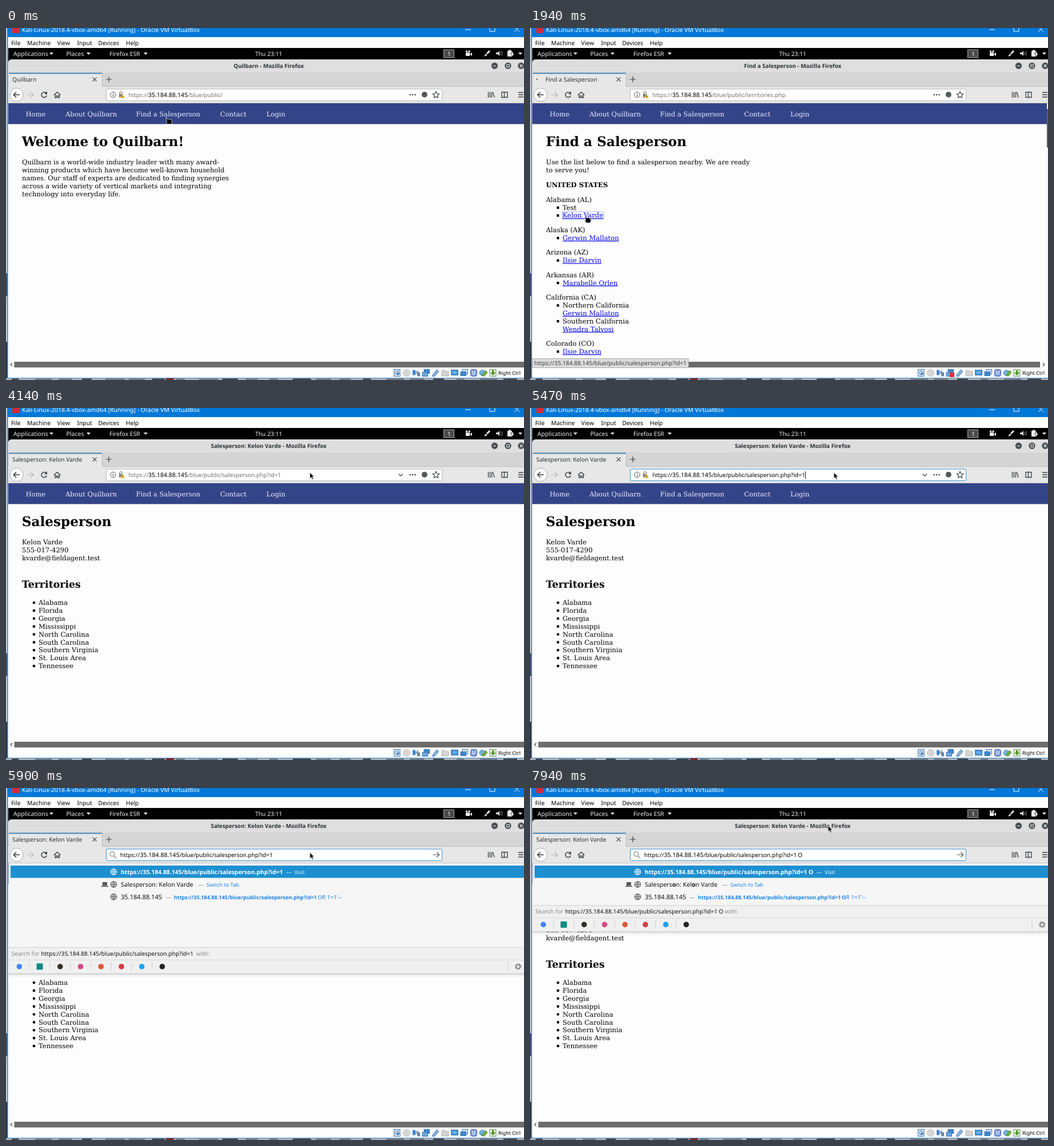
Recreate the animation shown at these times as an HTML page. Size 907 by 617 pixels, loop 8 s.

```html
<!DOCTYPE html>
<html lang="en">
<head>
<meta charset="utf-8">
<title>Desktop browsing</title>
<style>
html, body { margin: 0; width: 100%; height: 100%; overflow: hidden; background: #fff; }
svg { display: block; width: 907px; height: 617px; text-rendering: geometricPrecision; }
text { font-family: "Noto Sans", "Open Sans", sans-serif; white-space: pre; }
.serif { font-family: "DejaVu Serif", serif; }
.link { fill: #0000ee; text-decoration: underline; }
.line { fill: none; stroke: #3b3f42; stroke-width: 1.2; }
</style>
</head>
<body>
<svg id="stage" viewBox="0 0 907 617"></svg>
<script>
const LOOP = 8000;

// ---- drawing helpers ----
const rect = (x, y, w, h, fill, more = '') =>
  `<rect x="${x}" y="${y}" width="${w}" height="${h}" fill="${fill}" ${more}/>`;
const dot = (x, y, r, fill, more = '') => `<circle cx="${x}" cy="${y}" r="${r}" fill="${fill}" ${more}/>`;
const line = (d, more = '') => `<path class="line" d="${d}" ${more}/>`;
const shape = (d, fill, more = '') => `<path d="${d}" fill="${fill}" ${more}/>`;
const text = (x, y, size, str, fill = '#1c1f21', more = '') =>
  `<text x="${x}" y="${y}" font-size="${size}" fill="${fill}" ${more}>${str}</text>`;
const serif = (x, y, str, size = 11.6, fill = '#000', more = '') =>
  text(x, y, size, str, fill, `class="serif" ${more}`);
const bold = 'font-weight="700"';
const group = (id, body, more = '') => `<g id="${id}" ${more}>${body}</g>`;
const link = (x, y, str) => `<text x="${x}" y="${y}" font-size="11.6" class="serif link">${str}</text>`;

// ---- names ----
const firm = 'Quilbarn', seller = 'Kelon Varde';
const person = 'Salesperson: ' + seller;
const host = '35.184.88.145', dir = '/blue/public/';
const personUrl = `https://${host}${dir}salesperson.php?id=1`;

// ---- outer window ----
function frame() {
  let s = rect(0, 0, 907, 617, '#fff') + rect(2, 0, 905, 16, '#0078d7');
  s += rect(0, 0, 2, 617, '#c3ccd6') + rect(0, 430, 2, 40, '#34507c') + rect(0, 550, 2, 67, '#26344d');
  s += rect(2, 0, 1.5, 614, '#2f80bd');
  s += rect(0, 614, 907, 3, '#a9b3be') + rect(2, 613, 905, 1, '#4a90c4');
  for (let i = 0; i < 22; i++)
    s += rect(10 + i * 41, 614.5, 12 + (i * 17) % 23, 2.5, i % 3 ? '#6d7886' : '#39424e');
  s += rect(280, 614, 14, 3, '#7d2630');
  s += rect(11, -3, 12, 12, '#d42a36');
  s += text(28, 7.2, 10.46, 'Kali-Linux-2018.4-vbox-amd64 [Running] - Oracle VM VirtualBox', '#fff');
  s += line('M804 3h10M847 -3v9h9v-9M890 -2l9 9M899 -2l-9 9', 'style="stroke:#fff;stroke-width:1"');
  [[9, 'File'], [37, 'Machine'], [89.5, 'View'], [124.5, 'Input'], [161.5, 'Devices'], [210, 'Help']]
    .forEach(([x, m]) => s += text(x, 30, 10.3, m, '#000'));
  return s;
}

function topBar() {
  const caret = x => shape(`M${x} 43h7l-3.5 4z`, '#eee');
  let s = rect(4, 35, 903, 20, '#000');
  s += text(13, 48.8, 10.6, 'Applications', '#eee') + caret(76);
  s += text(105.5, 48.8, 10.5, 'Places', '#eee') + caret(141);
  s += text(181, 48.8, 10.4, 'Firefox ESR', '#eee') + caret(241);
  s += text(460, 48.8, 10.3, 'Thu 23:11', '#eee', 'text-anchor="middle"');
  s += rect(766.5, 38, 18, 14, '#4a4a4a', 'stroke="#aaa"') + text(773, 48.8, 10, '1', '#fff');
  s += rect(805, 43, 7, 6, '#eee') + dot(806.5, 41, 1.8, '#eee') + dot(811, 41, 1.8, '#eee') + shape('M812 46l4-3v6z', '#eee');
  s += shape('M837 50l3-5 3 2.5zM841 44l5-5 2 2-5 5z', '#eee');
  s += shape('M858 43h3l3-3v9l-3-3h-3z', '#ddd') +
    line('M865.5 42q2 2.5 0 5M868 40.5q3 4 0 8', 'style="stroke:#999;stroke-width:1"');
  s += rect(878, 40, 8, 10, '#eee') + rect(880, 38.5, 4, 2, '#eee') + shape('M885 42h3v3h2l-3.5 5-3-5h1.5z', '#eee', 'stroke="#000" stroke-width=".6"');
  return s + shape('M897 43h7l-3.5 4z', '#eee');
}

// ---- browser chrome ----
function browser() {
  let s = rect(4, 55, 903, 77, '#000') + shape('M4 132V61q0-6 6-6H907V132z', '#dedede');
  s += rect(4, 78, 903, 25, '#d5d5d5') + rect(5, 79, 163, 24, '#e7e7e7');
  s += rect(5, 78.5, 163, 1.8, '#3b7cae') + rect(168, 80, 1, 22, '#b9b9b9');
  s += rect(4, 102.5, 903, 29.5, '#e7e7e7') + rect(168, 102, 739, 1, '#bdbdbd') + rect(4, 131, 903, 1, '#c4c4c4');
  [855.5, 879, 902].forEach(x => s += dot(x, 66.3, 5.7, '#4c5052'));
  s += line('M853 66.5h5M877 64h4.5v4.5h-4.5zM899.8 64l4.6 4.6M904.4 64l-4.6 4.6', 'style="stroke:#eee;stroke-width:1.1"');
  s += rect(5, 80.3, 10, 22.2, '#7fb9e6', 'id="burst"');
  s += line('M151.7 86.7l7 7M158.7 86.7l-7 7M175 90h10M180 85v10');
  s += dot(18.5, 117, 11.7, '#fbfbfb', 'stroke="#aaa"');
  s += line('M24 117H13.5M18 112.3l-4.7 4.7 4.7 4.7', 'style="stroke-width:1.6"');
  s += line('M37 117h11M43.5 112.5l4.5 4.5-4.5 4.5', 'style="stroke:#b5b5b5"');
  s += group('reload', line('M70.6 114.6a4.6 4.6 0 1 0 .6 3.6', 'style="stroke-width:1.5"') + shape('M72 111v5h-5z', '#3b3f42'));
  s += group('stop', line('M62 112.7l9 9M71 112.7l-9 9', 'style="stroke:#a0a0a0;stroke-width:1.4"'));
  s += line('M84 117.6l5.7-5.2 5.7 5.2M86 116.5v5.5h2.5v-3h2.4v3h2.5v-5.5', 'style="stroke-width:1.4"');
  s += rect(175.5, 107, 588, 20.4, '#fff', 'id="bar" rx="2"');
  s += group('chevron', line('M687.5 115.5l3.7 3.7 3.7-3.7'));
  s += group('pageTools', [707.7, 712, 716.3].map(x => dot(x, 117, 1.3, '#3b3f42')).join('') +
    dot(732.8, 116.8, 5, '#55595c') +
    line('M753 111.3l1.7 3.7 4 .5-3 2.8.8 4-3.5-2-3.5 2 .8-4-3-2.8 4-.5z'));
  s += line('M844.5 112v10M847.5 112v10M850.5 112v10M852.3 112.3l3 9.5M868 112.5h10v9h-10zM872.5 112.5v9M897 113h9M897 117h9M897 121h9', 'style="stroke-width:1.3"');
  return s;
}

const urlIcons = dot(187.5, 117, 4.8, 'none', 'stroke="#555"') + rect(187, 116, 1.2, 4, '#555') + rect(187, 113.8, 1.2, 1.3, '#555') +
  rect(198, 115.5, 6.5, 6, '#777') + line('M199 115.5v-2.2q2.2-3.6 4.4 0v2.2', 'style="stroke:#777"') +
  shape('M204 115.5l4.5 7.5h-9z', '#f2b01e', 'stroke="#fff" stroke-width=".5"') + rect(203.6, 118, 1, 3, '#5b4300');

// Address in three runs so that the host can be darker
const address = (x, file, faint, dark) =>
  text(x, 121, 10, 'https://', faint) + text(x + 34.5, 121, 10.62, host, dark) +
  text(x + 104, 121, 10.05, dir + file, faint);

const salesFile = 'salesperson.php?id=1';
function addresses() {
  const idle = (id, file) => group(id, urlIcons + address(214.5, file, '#707070', '#000'));
  return idle('urlHome', '') + idle('urlList', 'territories.php') + idle('urlPerson', salesFile) +
    group('urlPicked', urlIcons + rect(214.5, 110, 267.5, 14.5, '#308cc6') + address(214.5, salesFile, '#fff', '#fff')) +
    group('urlEdit', urlIcons + address(214.5, salesFile, '#000', '#000') + rect(481.7, 111, 1, 13, '#000')) +
    group('urlTyped', dot(186, 115.8, 3.9, 'none', 'stroke="#888" stroke-width="1.3"') +
      line('M189 119l4 4', 'style="stroke:#888;stroke-width:1.5"') +
      address(200, salesFile, '#000', '#000') +
      line('M747.5 117h11M754 112.3l4.7 4.7-4.7 4.7', 'style="stroke:#555"'));
}

// ---- web pages ----
function nav(w) {
  let s = rect(4, 132, w, 36.4, '#334488');
  [[34.5, 'Home'], [104, 'About ' + firm], [227.7, 'Find a Salesperson'], [375, 'Contact'], [456, 'Login']]
    .forEach(([x, label]) => s += serif(x, 155.2, label, 11.6, '#eef'));
  return s;
}

const heading = str => serif(27.7, 206.5, str, 23.2, '#000', bold);
const lines = (x, y, rows, size) => rows.map((r, i) => serif(x, y + i * 13.87, r, size)).join('');

function home() {
  return nav(903) + heading(`Welcome to ${firm}!`) + lines(28, 239.3, [
    firm + ' is a world-wide industry leader with many award-',
    'winning products which have become well-known household',
    'names. Our staff of experts are dedicated to finding synergies',
    'across a wide variety of vertical markets and integrating',
    'technology into everyday life.'], 11.52);
}

function list() {
  const square = y => rect(46.8, y - 5.8, 4.2, 4.2, '#000');
  const item = (y, str) => square(y) + link(57, y, str);
  let s = nav(901) + heading('Find a Salesperson');
  s += lines(28, 239.3, ['Use the list below to find a salesperson nearby. We are ready', 'to serve you!'], 11.52);
  s += serif(28, 279.2, 'UNITED STATES', 11.6, '#000', bold);
  [[304.8, 'Alabama (AL)'], [358, 'Alaska (AK)'], [397.3, 'Arizona (AZ)'], [436.7, 'Arkansas (AR)'],
    [476, 'California (CA)'], [557, 'Colorado (CO)']].forEach(([y, str]) => s += serif(28, y, str));
  [[318.6, 'Test'], [490, 'Northern California'], [517.7, 'Southern California']]
    .forEach(([y, str]) => s += square(y) + serif(57, y, str));
  [[332.4, seller], [371.9, 'Gerwin Mallaton'], [411.2, 'Ilsie Darvin'], [450.6, 'Marabelle Orlen'], [571, 'Ilsie Darvin']]
    .forEach(([y, str]) => s += item(y, str));
  s += link(57, 503.8, 'Gerwin Mallaton') + link(57, 531.6, 'Wendra Talvosi');
  s += rect(56.5, 322, 72.5, 13, 'none', 'id="ring" stroke="#4a6fd8" stroke-dasharray="1 1"');
  return s + rect(905, 132, 2, 453, '#f4f4f4') + rect(905, 142, 2, 67.5, '#5f5f5f');
}

function profile() {
  const places = ['Alabama', 'Florida', 'Georgia', 'Mississippi', 'North Carolina', 'South Carolina',
    'Southern Virginia', 'St. Louis Area', 'Tennessee'];
  return nav(903) + heading('Salesperson') +
    lines(28, 239.3, [seller, '555-017-4290', 'kvarde@fieldagent.test']) +
    serif(27.7, 315.2, 'Territories', 17.4, '#000', bold) + lines(57, 345.2, places) +
    places.map((_, i) => dot(49, 341.3 + i * 13.87, 2.3, '#000')).join('');
}

function bottom() {
  let s = rect(4, 585, 903, 10.5, '#fdfdfd') + rect(14.5, 585, 893, 10, '#6c6c6c');
  s += line('M11 587.3l-3 2.8 3 2.8', 'style="stroke:#444"');
  s += group('rightEnd', rect(893, 585, 14, 10.5, '#fdfdfd') + line('M898 587.3l3 2.8-3 2.8', 'style="stroke:#444"'));
  s += group('hint', rect(4.5, 579.5, 273, 16, '#dcdcdc', 'stroke="#aaa"') +
    text(7.5, 591, 10.2, personUrl, '#3a3a3a'));
  return s;
}

function tray() {
  const y = 604.5, blue = '#3f86cf', pale = '#cfe3f7', edge = 'stroke="#4677ad" stroke-width="1"';
  let s = rect(4, 596, 903, 17, '#fff');
  s += rect(679.5, y - 6, 10.5, 12, pale, edge) + dot(685, y, 3.2, '#fff', edge) + shape('M684 603l5 2.5-4 3z', '#2d66a8');
  s += dot(701.5, y, 6, '#dcdcdc', 'stroke="#b5b5b5"') + dot(701.5, y, 1.8, '#fff', 'stroke="#aaa"');
  s += rect(712, y - 5, 5, 9, blue) + shape('M717 603l5-4v9l-5-3z', '#9ab') + rect(720, y - 1, 5, 7, '#6b87a5');
  s += rect(732, y - 6, 9.5, 7, blue, edge) + rect(729, y - 1, 9.5, 7, '#6aa7e2', edge);
  s += rect(735, 604, 8, 8, '#d8323c', 'id="traffic"');
  s += shape('M747 608l7-9 4 3-7 8-4 1z', '#8db5dd', edge);
  s += shape('M763 600h5l1 2h6v8h-12z', '#d4d4d4', 'stroke="#b0b0b0"');
  s += rect(779.5, y - 5, 12, 9, blue, edge) + rect(781.5, y - 3, 8, 5, '#62aff0');
  s += rect(799, y - 6, 9.5, 8, pale, edge) + rect(796, y - 2, 9.5, 7, blue, edge);
  s += rect(813.5, y - 6, 11, 12, '#7d9bdb', 'rx="3" stroke="#4a67a8"') + line('M817 601v4q2 4 4 0v-4', 'style="stroke:#fff"');
  s += dot(834, y, 4.8, '#72b5e6', edge) + shape('M833 608l7-8 3 4-6 7z', '#6fae42', 'stroke="#3e7020" stroke-width=".6"');
  s += rect(847, y - 6, 11, 12, '#e7efe0', 'stroke="#6f9160"') + shape('M851 600h3.5v4h3l-4.8 5-4.7-5h3z', '#4c9a2a');
  return s + text(862, 608.2, 8.9, 'Right Ctrl', '#000');
}

// ---- suggestion panel ----
const globe = (y, c) => dot(188.5, y, 5.2, 'none', `stroke="${c}" stroke-width="1.1"`) +
  line(`M183.5 ${y}h10M188.5 ${y - 5}v10M188.5 ${y - 5}q-5 5 0 10q5-5 0-10`, `style="stroke:${c};stroke-width:.9"`);

function panel() {
  const blue = '#1a83e8', grey = '#8a8a8a';
  let s = rect(4.5, 132, 903, 193, '#f6f6f6', 'id="sheet"') + rect(8, 136, 899, 21.5, '#1d8fd1');
  s += globe(147, '#fff') + text(201, 150.8, 10.32, personUrl, '#fff', bold);
  s += group('visit', text(490.5, 150.8, 9.5, '—', '#cfe8fa') + text(505, 150.8, 9.2, 'Visit', '#e8f5ff'));
  s += rect(169, 165, 8, 6, '#555') + rect(167, 171.5, 12, 1.7, '#555');
  s += globe(169, '#4c4c4c') + globe(190.7, '#4c4c4c');
  s += group('plainTab', text(201, 172.8, 10.7, person, '#111'));
  s += group('markedTab', text(201, 172.8, 10.7, person.replace(/on/g, `<tspan ${bold}>o</tspan>n`), '#111'));
  s += text(336.5, 172.8, 9.5, '—', grey) + text(351, 172.8, 9.25, 'Switch to Tab', blue);
  s += text(201, 194.6, 11.1, host, '#111') + text(279.5, 194.6, 9.5, '—', grey);
  s += text(294, 194.7, 9.1, personUrl, blue, bold);
  s += group('plainOr', text(546, 194.7, 9.4, 'O', blue)) + text(553.3, 194.7, 10, "R 1=1'--", blue);

  let f = rect(4.5, 279, 903, 46, '#f0f0f0') + rect(4.5, 279, 903, 1, '#d2d2d2') + rect(4.5, 301, 903, 1, '#d9d9d9');
  f += text(9.5, 293.8, 10.2, 'Search for', grey) + text(61.5, 293.8, 10.2, personUrl, '#111');
  f += text(0, 293.8, 10.2, 'with:', grey, 'id="with"');
  ['#4285f4', '#0f8a83', '#33302c', '#d8477f', '#de5833', '#d33c44', '#1da1f2', '#222'].forEach((c, i) => {
    const x = 23.3 + i * 35.75;
    f += i === 1 ? rect(x - 5.5, 307.5, 11, 11, c) : dot(x, 313, 4.8, c);
    if (i < 7) f += rect(x + 17.4, 306, 1, 14, '#cfcfcf');
  });
  f += rect(878.5, 305, 1, 16, '#cfcfcf') + dot(896.7, 313, 3.3, 'none', 'stroke="#777" stroke-width="1.6"') +
    dot(896.7, 313, 5, 'none', 'stroke="#777" stroke-width="1.6" stroke-dasharray="1.9 2.03"');
  f += rect(4.5, 325, 903, 1, '#c2c2c2') + rect(4.5, 326, 903, 2, '#000', 'opacity=".06"') + rect(4.5, 326, 903, 5, '#000', 'opacity=".04"');
  const typed = text(487.8, 150.8, 10.32, 'O', '#fff', bold) + text(469, 121, 10.2, 'O', '#000') +
    text(330.5, 220.2, 10.2, 'O', '#111') + text(546, 194.7, 9.1, 'O', blue, bold);
  return s + group('foot', f) + group('typedO', typed);
}

const arrow = shape('M0 0V10.8L2.5 8.5L4.3 12.4L6.2 11.5L4.4 7.7H7.8Z', '#111', 'stroke="#fff" stroke-width=".7"');
const hand = shape('M-4 -6q1.6-1 2 .8l.7 2q4-.8 7 .9l1 3-1 4.8H-1L-4.4 1.8q.5-1.6 2.2-.6L-4 -6z', '#000', 'stroke="#fff" stroke-width=".7"');

const stage = document.getElementById('stage');
stage.innerHTML = frame() + topBar() + browser() +
  text(460, 69.8, 9.82, '', '#2c3133', `id="title" text-anchor="middle" ${bold}`) +
  text(11, 93.8, 10.3, '', '#2c3133', 'id="tab"') + dot(12, 90, 1.2, '#666', 'id="busy"') + addresses() +
  rect(4, 132, 903, 464, '#fdfdfd') + group('home', home()) + group('list', list()) + group('profile', profile()) +
  bottom() + tray() + group('panel', panel()) + rect(469.3, 111, 1, 13, '#000', 'id="blink"') +
  group('cursor', group('arrow', arrow) + group('hand', hand));

const el = {};
stage.querySelectorAll('[id]').forEach(n => el[n.id] = n);

// ---- timeline ----
// time, x, y of the pointer
const moves = [
  [0, 284, 163], [150, 286, 163], [450, 287, 166], [590, 292, 186], [720, 301, 210], [850, 294, 238], [990, 266, 268],
  [1130, 225, 296], [1270, 180, 316], [1410, 140, 328], [1530, 112, 335], [1670, 100, 336], [2090, 118, 337],
  [2230, 220, 342], [2360, 380, 340], [2630, 400, 298], [2760, 431, 240], [2900, 469, 185], [3020, 508, 139],
  [3160, 556, 100], [3300, 618, 85], [3430, 662, 92], [3570, 686, 104], [3720, 655, 109], [3860, 596, 112],
  [4000, 550, 113], [4130, 532, 113], [6830, 531, 103], [6970, 526, 80], [7130, 521, 64], [7410, 522, 66]];
// time, left part of the tab tint, opacity
const tint = [[0, 0, 0], [590, 26, 1], [720, 68, .9], [850, 120, .6], [990, 163, .3], [1130, 0, 0], [2230, 68, .9], [2360, 0, 0]];
const traffic = [[1810, 2090], [4250, 4390], [4790, 4940], [6970, 7130]];

const at = (table, t) => table.reduce((a, row) => row[0] <= t ? row : a);
const show = (id, on) => el[id].style.display = on ? '' : 'none';
const set = (id, attrs) => { for (const k in attrs) el[id].setAttribute(k, attrs[k]); };

function render(t) {
  const within = (a, b) => t >= a && t < b;
  const page = t < 590 ? 'home' : t < 2230 ? 'list' : 'profile';
  const name = { home: firm, list: 'Find a Salesperson', profile: person }[page];
  ['home', 'list', 'profile'].forEach(p => show(p, p === page));
  el.title.textContent = name + ' - Mozilla Firefox';
  el.tab.textContent = name;

  const busy = within(450, 590) || within(1810, 2230);
  show('busy', busy);
  set('busy', { cx: 12 + 4 * Math.sin((t - 1940) / 130) });
  set('tab', { x: busy ? 27 : 11 });
  show('stop', within(450, 850));
  show('reload', !within(450, 850));
  const [, w, o] = at(tint, t);
  set('burst', { width: w, opacity: o });

  show('urlHome', page === 'home');
  show('urlList', page === 'list');
  show('urlPerson', within(2230, 4250));
  show('urlPicked', within(4250, 5470));
  show('urlEdit', within(5470, 5620));
  show('urlTyped', t >= 5620);
  set('bar', { stroke: t >= 4250 ? '#3a93cf' : '#b9b9b9' });
  show('chevron', within(3720, 5620));
  show('pageTools', t < 5620);
  show('blink', within(6830, 7130));

  show('ring', within(1810, 2230));
  show('hint', within(1530, 2230));
  show('rightEnd', page === 'list');
  show('traffic', traffic.some(([a, b]) => within(a, b)));

  const typed = t >= 7940;
  const shift = t < 5900 ? 88 : t < 6020 ? 0 : -73.6;
  show('panel', t >= 5620);
  set('foot', { transform: `translate(0 ${shift})` });
  set('sheet', { height: 193 + shift });
  set('visit', { transform: `translate(${typed ? 11 : 0} 0)` });
  set('with', { x: typed ? 341 : 333 });
  show('typedO', typed);
  show('markedTab', typed);
  show('plainTab', !typed);
  show('plainOr', !typed);

  const [, x, y] = at(moves, t);
  const pointing = t < 590 || within(1530, 2230);
  set('cursor', { transform: `translate(${x} ${y})` });
  show('hand', pointing);
  show('arrow', !pointing);
}

const start = performance.now();
function tick() {
  render((performance.now() - start) % LOOP);
  requestAnimationFrame(tick);
}
tick();
</script>
</body>
</html>
```
